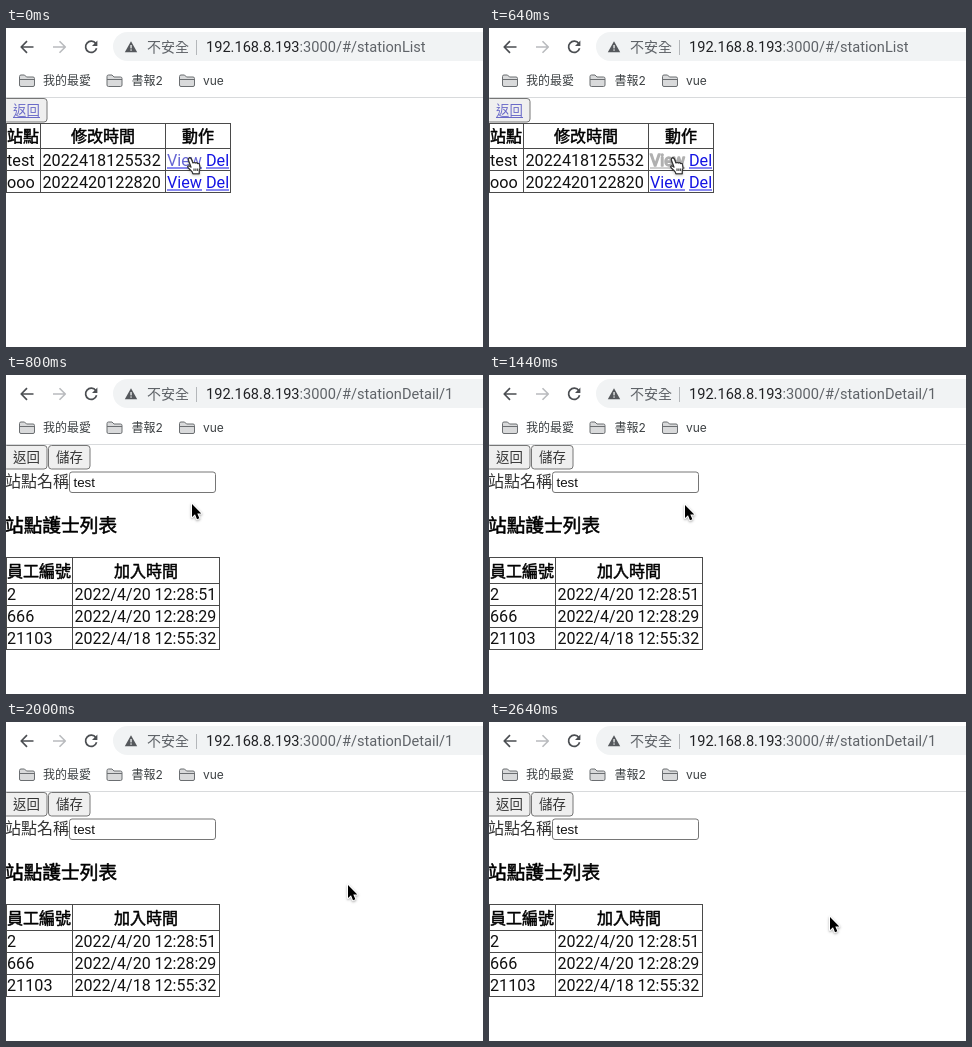
These frames come from a looping animation (477x319 px, 2800 ms). An HTML page with a canvas:

```html
<!DOCTYPE html>
<html lang="zh-Hant">
<head>
<meta charset="utf-8">
<title>Station list</title>
<style>
html, body { margin: 0; width: 100%; height: 100%; overflow: hidden; background: #fff; }
canvas { display: block; }
</style>
</head>
<body>
<canvas id="stage" width="477" height="319"></canvas>
<script>
const ctx = document.getElementById('stage').getContext('2d');
const LOOP = 2800, STEP = 80;
const SANS = 'Roboto, "Noto Sans CJK TC", "Noto Sans CJK", sans-serif';
const CJK = '"Noto Sans CJK TC", "Noto Sans CJK", sans-serif';
const ARIAL = '"Liberation Sans", sans-serif';
const BODY = `16.2px ${SANS}`, HEAD = `16px ${CJK}`, URL_FONT = `14.6px ${SANS}`;
const BUTTON = `13.4px ${CJK}`;
const INK = '#111', LINK = '#1414e4';

function text(str, x, y, font = BODY, color = INK, align = 'left') {
  ctx.font = font;
  ctx.fillStyle = color;
  ctx.textAlign = align;
  ctx.fillText(str, x, y);
}

// Regular glyphs thickened by an outline, keeping their advance widths.
function heavyText(str, x, y, font, align = 'left', color = '#000', weight = 0.5) {
  text(str, x, y, font, color, align);
  ctx.strokeStyle = color;
  ctx.lineWidth = weight;
  ctx.lineJoin = 'round';
  ctx.strokeText(str, x, y);
}

function underline(str, x, y, color) {
  ctx.fillStyle = color;
  ctx.fillRect(x, y + 2, Math.round(ctx.measureText(str).width), 1);
}

function link(str, x, y, color = LINK, font = BODY, lineColor = color) {
  text(str, x, y, font, color);
  underline(str, x, y, lineColor);
}

function box(x, y, w, h, r, fill, stroke) {
  ctx.beginPath();
  ctx.roundRect(x, y, w, h, r);
  ctx.fillStyle = fill;
  ctx.fill();
  if (!stroke) return;
  ctx.strokeStyle = stroke;
  ctx.lineWidth = 1;
  ctx.stroke();
}

function stroke(path, color, width) {
  ctx.strokeStyle = color;
  ctx.lineWidth = width;
  ctx.stroke(new Path2D(path));
}

function grid(xs, ys) {
  const left = xs[0], right = xs[xs.length - 1];
  const top = ys[0], bottom = ys[ys.length - 1];
  const lines = xs.map(x => `M${x} ${top}V${bottom}`)
    .concat(ys.map(y => `M${left - 0.5} ${y}H${right + 0.5}`));
  stroke(lines.join(''), '#4a4a4a', 1);
}

function folder(x) {
  ctx.fillStyle = '#d9dadb';
  const shape = `M${x + 0.5} 57V48.5Q${x + 0.5} 47 ${x + 2} 47H${x + 5.5}L${x + 7.5} 49H${x + 14}` +
    `Q${x + 15.5} 49 ${x + 15.5} 50.5V57Q${x + 15.5} 58.5 ${x + 14} 58.5H${x + 2}Q${x + 0.5} 58.5 ${x + 0.5} 57Z`;
  ctx.fill(new Path2D(shape));
  stroke(shape + `M${x + 0.5} 51.5H${x + 15.5}`, '#6b6e71', 1);
}

function browserBar(path) {
  stroke('M27.5 19H15.5M21 13.2L15.2 19L21 24.8', '#4b4e52', 1.7);
  stroke('M47 19H59M53.5 13.2L59.3 19L53.5 24.8', '#b9bbbe', 1.6);
  stroke('M89.8 15.6A5.6 5.6 0 1 0 90.6 20.3', '#4b4e52', 1.7);
  ctx.fillStyle = '#4b4e52';
  ctx.fill(new Path2D('M91.4 12.6V18H86Z'));

  box(107, 4, 400, 29, 14.5, '#f1f3f4');
  ctx.fillStyle = '#55585c';
  ctx.fill(new Path2D('M125 13.3L131.2 24.3H118.8Z'));
  ctx.fillStyle = '#f1f3f4';
  ctx.fillRect(124.4, 17, 1.3, 3.4);
  ctx.fillRect(124.4, 21.4, 1.3, 1.3);
  text('不安全', 141, 24.3, `14px ${CJK}`, '#5f6368');
  ctx.fillStyle = '#b4b7ba';
  ctx.fillRect(190, 12, 1, 15);
  const host = '192.168.8.193';
  text(host, 200, 24, URL_FONT, '#202124');
  text(':3000/#/' + path, 200 + ctx.measureText(host).width, 24, URL_FONT, '#5f6368');

  [[13, '我的最愛', 37], [100.5, '書報2', 125.5], [173, 'vue', 197]].forEach(([x, label, labelX]) => {
    folder(x);
    text(label, labelX, 57.3, `12px Inter, ${CJK}`, '#3c4043');
  });
  ctx.fillStyle = '#d8dadc';
  ctx.fillRect(0, 69, 477, 1);
}

function button(x, w) {
  box(x, 70.5, w, 23.5, 3, '#efefef', '#767676');
}

function listPage(pressed) {
  browserBar('stationList');
  button(-2.5, 43.5);
  link('返回', 7, 87, '#6a6ac8', BUTTON);
  grid([0.5, 34.5, 159.5, 224.5], [95.5, 120.5, 142.5, 164.5]);
  heavyText('站點', 1, 113.5, HEAD);
  heavyText('修改時間', 97, 113.5, HEAD, 'center');
  heavyText('動作', 192, 113.5, HEAD, 'center');
  [['test', '2022418125532', 137.5], ['ooo', '2022420122820', 159.5]].forEach(([name, stamp, y], row) => {
    text(name, 1, y);
    text(stamp, 36.5, y);
    link('Del', 200, y);
    if (row) {
      link('View', 161, y);
    } else if (pressed) {
      heavyText('View', 161, y, BODY, 'left', '#b0b0b0', 1.5);
      underline('View', 161, y, '#a0a0a0');
    } else {
      link('View', 161, y, '#6666d4', BODY, LINK);
    }
  });
}

function detailPage(loaded) {
  browserBar('stationDetail/1');
  button(-2.5, 43.5);
  button(42.5, 41.5);
  text('返回', 7, 87, BUTTON, '#333');
  text('儲存', 50, 87, BUTTON, '#333');
  text('站點名稱', -1, 112, HEAD, '#333');
  box(63.5, 97, 146, 20.5, 2.5, '#fff', '#767676');
  heavyText('站點護士列表', -1, 157, `18.7px ${CJK}`);
  heavyText('員工編號', 1, 201.5, HEAD);
  const right = loaded ? 213.5 : 133.5;
  heavyText('加入時間', (66.5 + right) / 2, 201.5, HEAD, 'center');
  if (!loaded) {
    grid([0.5, 66.5, right], [182.5, 208.5]);
    return;
  }
  text('test', 67.5, 111.5, `13.33px ${ARIAL}`);
  grid([0.5, 66.5, right], [182.5, 208.5, 230.5, 252.5, 274.5]);
  [['2', '2022/4/20 12:28:51'], ['666', '2022/4/20 12:28:29'], ['21103', '2022/4/18 12:55:32']]
    .forEach(([id, joined], i) => {
      text(id, 1, 224.7 + 22.2 * i);
      text(joined, 68.5, 224.7 + 22.2 * i, `16px ${SANS}`);
    });
}

const ARROW = new Path2D('M0 0V13L3 10.3L5 15.2L7.4 14.2L5.3 9.4H9.3Z');
const HAND = new Path2D('M4.6 10.2L1.9 3Q1.6 1.2 3 .9Q4.3 .7 4.9 2.2L6.4 6Q7.8 4.9 8.8 6.1' +
  'Q10.1 5.2 11 6.6Q12.4 6 13 7.6Q14 11 12.8 13.6L12.6 16.8H6.6Q6.2 14.6 3.2 12.2' +
  'Q1 10.4 1.3 9.3Q2.2 8.3 4.6 10.2Z');

function cursor(shape, x, y, fill, outline, width) {
  ctx.save();
  ctx.translate(x, y);
  ctx.lineJoin = 'round';
  ctx.strokeStyle = outline;
  ctx.lineWidth = width;
  ctx.shadowColor = 'rgba(0,0,0,.35)';
  ctx.shadowBlur = 2.5;
  ctx.shadowOffsetY = 1;
  ctx.stroke(shape);
  ctx.shadowColor = 'transparent';
  ctx.fillStyle = fill;
  ctx.fill(shape);
  if (shape === HAND) {
    ctx.stroke(shape);
    ctx.stroke(new Path2D('M7.5 11.5V14M9.4 11.5V14M11.2 11.5V14'));
  }
  ctx.restore();
}

const progress = (t, from, to) => Math.min(1, Math.max(0, (t - from) / (to - from)));
const smooth = u => u * u * (3 - 2 * u);

function arrowPosition(t) {
  const u = progress(t, 1360, 2000);
  const across = 0.3 * u + 0.7 * smooth(u);
  const down = smooth(progress(t, 2000, 2400));
  return [
    Math.round(185.5 + 156 * across - down),
    Math.round(129 + 34 * across ** 1.2 + 32 * down)
  ];
}

function draw(now) {
  const t = Math.floor((now % LOOP) / STEP) * STEP;
  ctx.fillStyle = '#fff';
  ctx.fillRect(0, 0, 477, 319);
  if (t < 720) {
    listPage(t >= 640);
    cursor(HAND, 180.5, 129, '#fff', '#333', 1.1);
  } else {
    detailPage(t >= 800);
    cursor(ARROW, ...arrowPosition(t), '#000', '#fff', 2);
  }
}

const start = performance.now();
function tick() {
  draw(performance.now() - start);
  requestAnimationFrame(tick);
}
tick();
</script>
</body>
</html>
```
